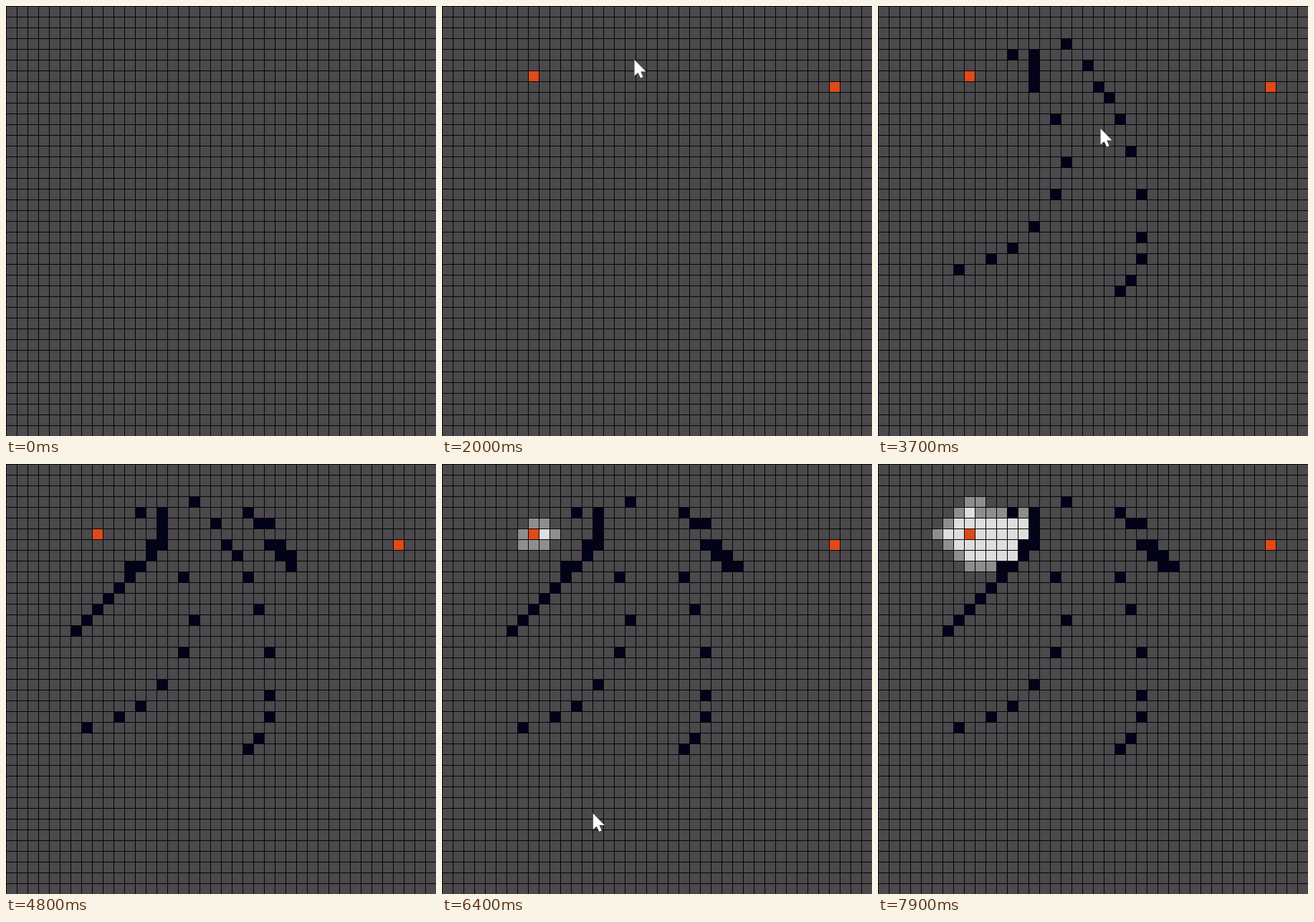
An HTML page with a canvas for the animation above (8 s loop, 600 by 600 pixels).

```html
<!DOCTYPE html>
<html lang="en">
<head>
<meta charset="utf-8">
<title>Grid path search</title>
<style>
  html, body { margin: 0; width: 100%; height: 100%; overflow: hidden; background: #4b494b; }
  canvas { display: block; width: 600px; height: 600px; }
</style>
</head>
<body>
<canvas id="stage" width="600" height="600"></canvas>
<script>
const ctx = document.getElementById('stage').getContext('2d');
const CELL = 15, COUNT = 40, LOOP = 8000, TICK = 100;
const START = [8, 6], GOAL = [36, 7];
const COLORS = { floor: '#4b494b', line: '#060506', wall: '#02021a', end: '#e04a18', open: '#8f8e8f', closed: '#dfdedf' };

// Point at u on a Bezier curve of any degree
function bezier(pts, u) {
  if (pts.length === 1) return pts[0];
  const mix = pts.slice(1).map((p, i) => p.map((v, j) => pts[i][j] * (1 - u) + v * u));
  return bezier(mix, u);
}

// Pointer gestures in grid units: they hover, draw walls or rub them out
const hover = (from, to, ...pts) => ({ from, to, pts, dabs: 0 });
const pen = (from, to, dabs, ...pts) => ({ from, to, pts, dabs });
const rub = (...args) => ({ ...pen(...args), erase: true });

const gestures = [
  hover(2, 3, [21.2, 13.7], [19.3, 13.2]),
  hover(6, 7, [11.7, 10.2], [12.4, 10.6]),
  hover(8, 8, [12.4, 10.6]),
  hover(11, 13, [12.2, 9.9], START),
  hover(14, 18, [12, 3], [22, -4], GOAL),
  hover(19, 20, [37.3, 6.4], [17.4, 4.5]),
  pen(21, 24, 8, [12, 4], [23.4, 18.2], [11.4, 22.8], [7.4, 24]),
  hover(25, 27, [12, 36], [25, 3.8]),
  pen(28, 30, 7, [17.4, 3], [19.6, 9.17], [21.8, 6.33], [24, 17]),
  pen(31, 31, 4, [24.4, 21], [22, 26.3]),
  hover(32, 34, [7.6, 31], [24, 49], [36.4, 22]),
  pen(35, 36, 4, [14, 4], [14, 7]),
  hover(37, 39, [20.2, 10.9], [53, 37], [14.5, 8]),
  pen(40, 43, 10, [13.4, 7.1], [10.6, 10.35], [6.2, 14.9]),
  hover(44, 44, [21.7, 4.3]),
  pen(45, 45, 3, [22, 4], [24, 5.2]),
  pen(46, 47, 5, [24.4, 6.9], [26.4, 8.9]),
  hover(50, 51, [38.3, 14.2], [33, 11.5]),
  pen(52, 52, 1, [27, 9]),
  hover(53, 57, [28, 10], [48, 16], [20, 5]),
  rub(58, 59, 3, [19, 5], [21, 8]),
  hover(60, 62, [22, 9], [20.3, 12.7]),
  hover(63, 65, [20.5, 23.6], [10.7, 35.3], [12.3, 33.8])
];

const arrow = new Path2D('M0 0V22.5L5 18L8.6 25.5L12.2 24L8.8 16.4H16Z');
const key = ([x, y]) => y * COUNT + x;
const progress = (g, k) => g.to === g.from ? 1 : Math.min(1, (k - g.from) / (g.to - g.from));

function wallsAt(k) {
  const walls = new Map();
  for (const g of gestures.filter(g => g.from <= k)) {
    const last = Math.max(1, g.dabs - 1);
    for (let i = 0; i < g.dabs && i <= progress(g, k) * last + 1e-9; i++) {
      const cell = bezier(g.pts, i / last).map(Math.round);
      if (g.erase) walls.delete(key(cell));
      else walls.set(key(cell), cell);
    }
  }
  return walls;
}

// A* with Manhattan distance, as a list of single cell recolourings
function search(total) {
  const walls = wallsAt(LOOP / TICK);
  const queue = [{ pos: START, g: 0, f: 0 }];
  const seen = new Set([key(START)]);
  const events = [];
  while (queue.length && events.length < total) {
    const best = queue.reduce((a, b) => b.f < a.f ? b : a);
    queue.splice(queue.indexOf(best), 1);
    const [x, y] = best.pos;
    for (const pos of [[x + 1, y], [x - 1, y], [x, y + 1], [x, y - 1]]) {
      if (walls.has(key(pos)) || seen.has(key(pos))) continue;
      const g = best.g + 1;
      const f = g + Math.abs(GOAL[0] - pos[0]) + Math.abs(GOAL[1] - pos[1]);
      seen.add(key(pos));
      queue.push({ pos, g, f });
      events.push([pos, COLORS.open]);
    }
    events.push([best.pos, COLORS.closed]);
  }
  return events;
}

const eventsAt = k => Math.max(0, Math.floor((k - 61.3) * 3.8));
const events = search(eventsAt(LOOP / TICK));

function fill([x, y], color) {
  ctx.fillStyle = color;
  ctx.fillRect(x * CELL, y * CELL, CELL, CELL);
}

function drawPointer(k) {
  const g = gestures.find(g => k >= g.from && k <= g.to);
  if (!g) return;
  const [x, y] = bezier(g.pts, progress(g, k));
  ctx.save();
  ctx.translate((x + 0.5) * CELL, (y + 0.5) * CELL);
  ctx.strokeStyle = '#222';
  ctx.stroke(arrow);
  ctx.fillStyle = '#fff';
  ctx.fill(arrow);
  ctx.restore();
}

function draw(k) {
  ctx.fillStyle = COLORS.floor;
  ctx.fillRect(0, 0, 600, 600);

  events.slice(0, eventsAt(k)).forEach(e => fill(...e));
  wallsAt(k).forEach(cell => fill(cell, COLORS.wall));
  if (k >= 13) fill(START, COLORS.end);
  if (k >= 18) fill(GOAL, COLORS.end);

  ctx.fillStyle = COLORS.line;
  for (let i = 0; i < COUNT; i++) {
    ctx.fillRect(i * CELL, 0, 1, 600);
    ctx.fillRect(0, i * CELL, 600, 1);
  }
  drawPointer(k);
}

const begin = performance.now();
function frame() {
  draw(Math.floor((performance.now() - begin) % LOOP / TICK));
  requestAnimationFrame(frame);
}
frame();
</script>
</body>
</html>
```
